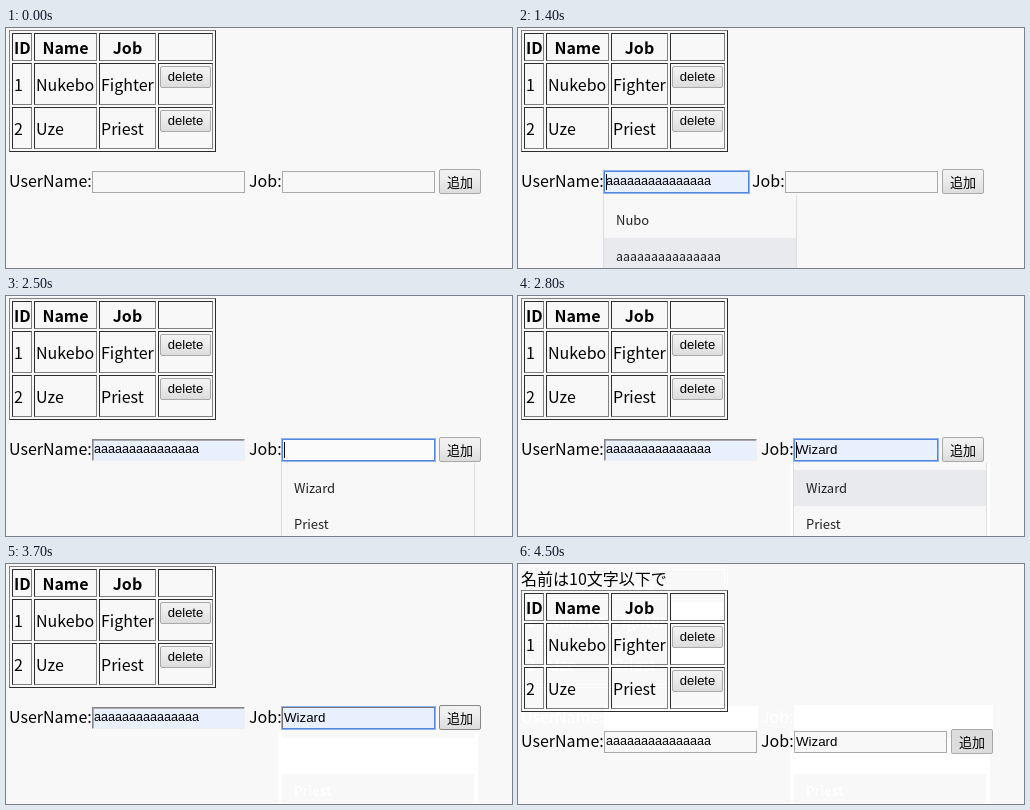
Write an HTML page that moves like this. It is 506 px wide and 240 px high and loops after 6100 ms.

```html
<!DOCTYPE html>
<html lang="ja">
<head>
<meta charset="utf-8">
<title>User list form</title>
<style>
html, body { margin: 0; width: 100%; height: 100%; overflow: hidden; background: #f8f8f8; }
body { position: relative; color: #000; font: 16px/24px "Noto Sans CJK JP", "Noto Sans CJK", sans-serif; }
.abs, .page, .field, .text, .caret, .popup, .add { position: absolute; white-space: nowrap; }
.page { left: 0; top: 0; width: 506px; height: 240px; }

/* Table */
table { position: absolute; left: 3px; top: 2px; width: 207px; height: 122px; table-layout: fixed;
  border-collapse: separate; border-spacing: 2px; box-sizing: border-box;
  border: 1px solid; border-color: #808080 #2c2c2c #2c2c2c #808080; }
th, td { box-sizing: border-box; padding: 1px; height: 42px; white-space: nowrap;
  border: 1px solid; border-color: #2c2c2c #808080 #808080 #2c2c2c; }
th { height: 28px; }
td:last-child { vertical-align: top; }
.button { box-sizing: border-box; border: 1px solid #a8a8a8; border-radius: 2px; text-align: center;
  background: linear-gradient(#f2f2f2, #ededed 38%, #dcdcdc); }
.delete { width: 51px; height: 22px; margin-top: 1px; font: 13px/20px "Liberation Sans", Arial, sans-serif; }
.add { left: 433px; top: 141px; width: 42px; height: 25px; font-size: 13px; line-height: 23px; }

/* Form */
.field { box-sizing: border-box; top: 143px; width: 153px; height: 22px; border: 1px solid #a9a9a9; }
.text { top: 143px; font: 13.333px/21px "Liberation Sans", Arial, sans-serif; }
.long { font-size: 12.6px; }
.caret { top: 146px; width: 1px; height: 16px; background: #000; }
.popup { box-sizing: border-box; top: 167px; width: 194px; height: 80px; padding-top: 7px;
  border: solid #dedede; border-width: 0 1px; background: #f8f8f8; font-size: 13px; line-height: 36px; color: #222; }
.popup div { height: 36px; padding-left: 12px; }
.popup .long { font-size: 12.45px; }

/* White residue left by closed and moved parts */
.residue, .residue * { color: #fff; border-color: #fff; }
.residue .button, .white { background: #fff; }

/* Timeline */
.anim { animation: 6.1s step-end infinite; }
.late { visibility: hidden; }
@keyframes shift-down { 73.77% { transform: translateY(24px); } }
@keyframes user-field {
  16.393% { background: #fbfbfb; border-color: #5585df; box-shadow: 0 0 0 1px #8fb2f2; }
  21.311% { width: 145px; background: #e8f0fe; border-color: #5585df; box-shadow: 0 0 0 1px #8fb2f2; }
  29.508% { width: 153px; background: #e8f0fe; border-color: #767676 #5585df #5585df #767676; box-shadow: 0 0 0 1px #8fb2f2; }
  37.705% { width: 153px; background: #e8f0fe; border-color: #888 #eee #eee #888; box-shadow: inset 1px 1px #aaa; }
  73.77% { width: 153px; background: #f8f8f8; border-color: #a9a9a9; box-shadow: none; }
}
@keyframes job-field {
  37.705% { background: #fbfbfb; border-color: #5585df; box-shadow: 0 0 0 1px #8fb2f2; }
  42.623% { width: 144px; background: #e8f0fe; border-color: #5585df; box-shadow: 0 0 0 1px #8fb2f2; }
  52.459% { width: 153px; background: #e8f0fe; border-color: #767676 #5585df #5585df #767676; box-shadow: 0 0 0 1px #8fb2f2; }
  65.574% { width: 153px; background: #e8f0fe; border-color: #888 #eee #eee #888; box-shadow: inset 1px 1px #aaa; }
  73.77% { width: 153px; background: #f8f8f8; border-color: #a9a9a9; box-shadow: none; }
}
@keyframes job-side { 21.311% { transform: translateX(-9px); } 29.508% { transform: none; } }
@keyframes add-button {
  42.623% { transform: translateX(-9px); }
  52.459% { transform: none; }
  59.016% { border-color: #888; }
  65.574% { border-color: #888; background: #dcdcdc; }
  67.213% { border-color: #a8a8a8; }
}
@keyframes user-open { 16.393% { visibility: visible; } 29.508% { visibility: hidden; } }
@keyframes user-end-caret { 29.508% { visibility: visible; } 37.705% { visibility: hidden; } }
@keyframes first-preview { 21.311% { visibility: visible; } 22.951% { visibility: hidden; } }
@keyframes first-hover { 21.311% { background: #e8eaed; } 22.951% { background: none; } }
@keyframes user-value { 22.951% { visibility: visible; } }
@keyframes second-hover { 22.951% { background: #e8eaed; } }
@keyframes job-open { 37.705% { visibility: visible; } 52.459% { visibility: hidden; } }
@keyframes job-value { 42.623% { visibility: visible; } }
@keyframes job-hover { 42.623% { background: #e8eaed; } }
@keyframes job-end-caret { 52.459% { visibility: visible; } 60.656% { visibility: hidden; } }
@keyframes popup-residue { 45.902% { visibility: visible; } }
@keyframes submitted { 73.77% { visibility: visible; } }
</style>
</head>
<body>
<div class="page anim late residue" style="animation-name:popup-residue">
  <div class="abs white" style="left:272px;top:168px;width:4px;height:72px"></div>
  <div class="abs white" style="left:468px;top:168px;width:4px;height:72px"></div>
  <div class="abs white" style="left:276px;top:174px;width:192px;height:36px"></div>
  <b class="abs" style="left:288px;top:215px;font-size:13px">Priest</b>
</div>

<div id="residue" class="page anim late residue" style="animation-name:submitted">
  <div class="abs white" style="left:86px;top:142px;width:154px;height:24px"></div>
  <div class="abs white" style="left:276px;top:141px;width:199px;height:25px"></div>
  <span class="abs" style="left:3px;top:140px">UserName:</span>
  <span class="abs" style="left:243px;top:140px">Job:</span>
</div>

<div class="abs anim late" style="left:3px;top:2px;animation-name:submitted">名前は10文字以下で</div>

<div class="page anim" style="animation-name:shift-down">
  <table>
    <colgroup><col style="width:20px"><col style="width:63px"><col style="width:57px"><col style="width:55px"></colgroup>
    <tr><th>ID</th><th>Name</th><th>Job</th><th></th></tr>
    <tr><td>1</td><td>Nukebo</td><td>Fighter</td><td><div class="button delete">delete</div></td></tr>
    <tr><td>2</td><td>Uze</td><td>Priest</td><td><div class="button delete">delete</div></td></tr>
  </table>

  <span class="abs" style="left:3px;top:140px">UserName:</span>
  <div class="field anim" style="left:86px;animation-name:user-field"></div>
  <span class="text anim late" style="left:88px;animation-name:first-preview">Nubo</span>
  <span class="text long anim late" style="left:88px;animation-name:user-value">aaaaaaaaaaaaaaa</span>
  <i class="caret anim late" style="left:88px;animation-name:user-open"></i>
  <i class="caret anim late" style="left:193px;animation-name:user-end-caret"></i>

  <div class="page anim" style="animation-name:job-side">
    <span class="abs" style="left:243px;top:140px">Job:</span>
    <div class="field anim" style="left:276px;animation-name:job-field"></div>
    <span class="text anim late" style="left:278px;animation-name:job-value">Wizard</span>
    <i class="caret anim late" style="left:278px;animation-name:job-open"></i>
    <i class="caret anim late" style="left:319px;animation-name:job-end-caret"></i>
    <div class="button add anim" style="animation-name:add-button">追加</div>
  </div>
</div>

<div class="popup anim late" style="left:85px;animation-name:user-open">
  <div class="anim" style="animation-name:first-hover">Nubo</div>
  <div class="long anim" style="animation-name:second-hover">aaaaaaaaaaaaaaa</div>
</div>
<div class="popup anim late" style="left:275px;animation-name:job-open">
  <div class="anim" style="animation-name:job-hover">Wizard</div>
  <div>Priest</div>
</div>

<script>
  // The moved table leaves a white copy at its old position.
  document.getElementById('residue').append(document.querySelector('table').cloneNode(true));
</script>
</body>
</html>
```
